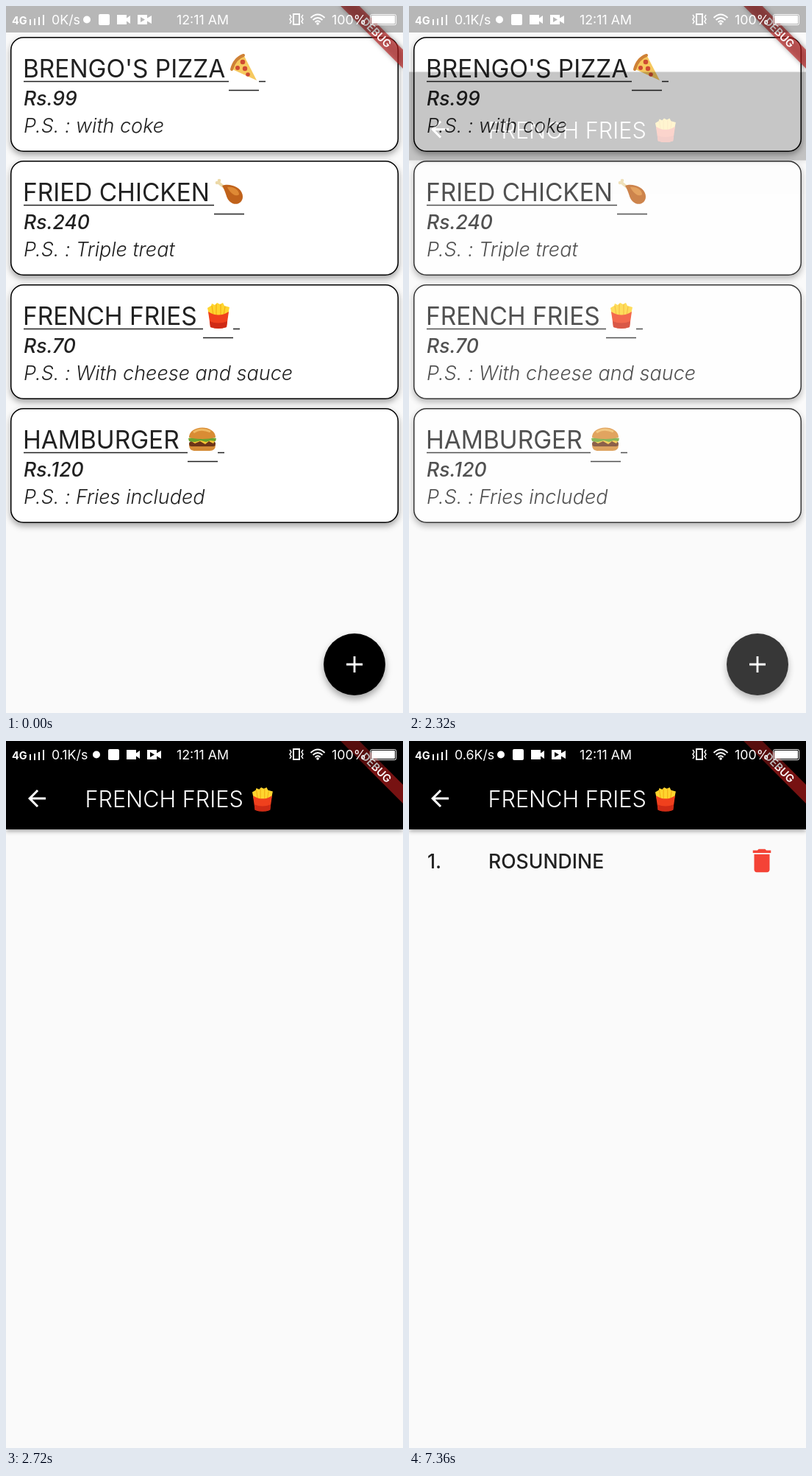
An HTML page that plays this animation: 540x960 px, repeating every 8 s.

```html
<!DOCTYPE html>
<html lang="en">
<head>
<meta charset="utf-8">
<title>Food orders</title>
<style>
  html, body { margin: 0; width: 100%; height: 100%; overflow: hidden; background: #fafafa; }
  svg { display: block; width: 540px; height: 960px; font-family: Inter, Roboto, sans-serif; }
  .card { fill: #fff; stroke: #000; stroke-width: 1.5; filter: drop-shadow(0 4px 4px rgba(0,0,0,.36)); }
  .ink { fill: #212121; }
  .rule { stroke: #212121; stroke-width: 1.6; fill: none; }
  .title { font-size: 33.4px; }
  .price { font-size: 26.5px; font-weight: 500; font-style: italic; }
  .note { font-size: 27px; font-weight: 300; font-style: italic; }
  .row { font-size: 26.6px; font-weight: 500; }
  .heading { fill: #fff; font-size: 30.6px; font-weight: 300; }
  .fab { filter: drop-shadow(0 5px 5px rgba(0,0,0,.35)); }
  .bar { filter: drop-shadow(0 2px 3px rgba(0,0,0,.4)); }
  .status { fill: #fff; font-size: 17.8px; }
  .line { fill: none; stroke: #fff; }
</style>
</head>
<body>
<svg viewBox="0 0 540 960">
  <defs>
    <g id="pizza">
      <path d="M5 22Q9 8 21 4L38 37Z" fill="#f6c95f"/>
      <path d="M4 22Q8 7 20 3" fill="none" stroke="#cf8136" stroke-width="4" stroke-linecap="round"/>
      <g fill="#cf4b32">
        <circle cx="19" cy="12" r="3.3"/><circle cx="12" cy="20" r="3"/>
        <circle cx="22" cy="21" r="3.2"/><circle cx="26" cy="29" r="2.8"/>
      </g>
    </g>
    <g id="chicken">
      <path d="M5 7L16 16" stroke="#ecd9a8" stroke-width="4"/>
      <circle cx="4" cy="8" r="2.3" fill="#ecd9a8"/><circle cx="7" cy="5" r="2.3" fill="#ecd9a8"/>
      <path d="M11 12C21 8 39 14 39 27C39 36 29 40 22 34C16 29 17 22 11 12Z" fill="#c0621b"/>
      <path d="M18 14C27 13 34 18 34 24C29 28 22 22 18 14Z" fill="#de8934"/>
    </g>
    <g id="fries">
      <path d="M6 10L11 7 12 4 16 6 19 3 23 5 27 3 29 7 36 9 33 24H9Z" fill="#ffd52e"/>
      <path d="M12 7L14 20M18 5V20M24 5V20M30 8L28 20" stroke="#f3ae16" stroke-width="1.2"/>
      <path d="M7 15Q21 24 35 15L32 36Q21 40 10 36Z" fill="#f0401d"/>
      <path d="M9 28L10 36Q21 40 32 36L33 28Q21 33 9 28Z" fill="#cf2a15"/>
    </g>
    <g id="burger">
      <path d="M2 28H38Q38 36 30 36H10Q2 36 2 28Z" fill="#d48a35"/>
      <rect x="2" y="23" width="36" height="7" rx="3.5" fill="#6d3518"/>
      <path d="M2 21H38L35 26 29 23 24 27 17 23 10 26Z" fill="#f8c534"/>
      <path d="M1 19Q20 15 39 19L38 23 31 22 25 24 18 22 10 24 2 23Z" fill="#6aa52f"/>
      <path d="M2 18C2 0 38 0 38 18Q20 22 2 18Z" fill="#d98c34"/>
      <path d="M8 11Q18 4 31 10" fill="none" stroke="#efb861" stroke-width="3"/>
    </g>
  </defs>

  <rect width="540" height="960" fill="#fafafa"/>
  <g id="list"></g>
  <g class="fab"><circle cx="474" cy="894" r="42"/></g>
  <path class="line" d="M463 894H485M474 883V905" stroke-width="2.8"/>

  <g id="page">
    <rect width="540" height="960" fill="#fafafa"/>
    <rect class="bar" width="540" height="120"/>
    <path transform="translate(24 60) scale(1.5)" fill="#fff"
      d="M20 11H7.83l5.59-5.59L12 4l-8 8 8 8 1.41-1.41L7.83 13H20v-2z"/>
    <text class="heading" x="107.5" y="90">FRENCH FRIES</text>
    <use href="#fries" transform="translate(329.4 60.2) scale(.93)"/>
    <g id="row">
      <g class="ink row"><text x="25" y="173">1.</text><text x="108" y="173">ROSUNDINE</text></g>
      <path transform="translate(459 141.5) scale(1.75)" fill="#f44336"
        d="M6 19c0 1.1.9 2 2 2h8c1.1 0 2-.9 2-2V7H6v12zM19 4h-3.5l-1-1h-5l-1 1H5v2h14V4z"/>
    </g>
  </g>

  <g transform="translate(540 0) rotate(45)">
    <rect x="-60" y="42" width="120" height="18" fill="#b71c1c" fill-opacity=".65"
      style="filter:drop-shadow(0 0 3px rgba(0,0,0,.5))"/>
    <text y="56.4" text-anchor="middle" fill="#fff" font-size="14.6" font-weight="600">DEBUG</text>
  </g>

  <rect width="540" height="36" fill-opacity=".27"/>
  <g class="status">
    <text x="8" y="25" font-size="14.5" font-weight="700">4G</text>
    <path class="line" d="M33 26V18M39 26V17M45 26V15M51 26V12" stroke-width="2"/>
    <text id="speed" x="62" y="25"></text>
    <g id="icons">
      <circle cx="110" cy="18.5" r="5"/>
      <rect x="126" y="11" width="15" height="15" rx="2"/>
      <path d="M151 12H164V16.5L169 13V24L164 20.5V25H151Z"/>
      <path fill-rule="evenodd" d="M179 12H192V16.5L198 13V24L192 20.5V25H179ZM183 15V22L189 18.5Z"/>
    </g>
    <text x="232" y="24.5">12:11 AM</text>
    <path class="line" d="M391 11H399V25H391Z" stroke-width="2"/>
    <path class="line" d="M386 12L388 15 386 18 388 21 386 24M404 12L402 15 404 18 402 21 404 24" stroke-width="1.4"/>
    <path class="line" d="M414.5 16Q424 7 433.5 16M417.5 19Q424 13 430.5 19M420.5 22Q424 18.5 427.5 22" stroke-width="2"/>
    <circle cx="424" cy="24" r="1.8"/>
    <text x="443" y="25">100%</text>
    <rect class="line" x="495.6" y="11.6" width="35" height="14" rx="2"/>
    <rect x="497" y="13" width="32" height="11" rx="1"/>
  </g>
</svg>
<script>
  const $ = id => document.getElementById(id);

  // title, price, note, emoji, emoji x, length of the underline after the emoji
  const foods = [
    ["BRENGO'S PIZZA", 99, "with coke", "pizza", 303, 9],
    ["FRIED CHICKEN", 240, "Triple treat", "chicken", 283, 0],
    ["FRENCH FRIES", 70, "With cheese and sauce", "fries", 268, 9],
    ["HAMBURGER", 120, "Fries included", "burger", 247, 9]
  ];
  $("list").innerHTML = foods.map(([title, price, note, emoji, x, tail], i) => `
    <g transform="translate(0 ${168 * i})">
      <rect class="card" x="6.75" y="42.75" width="526.5" height="154.5" rx="17"/>
      <g class="ink">
        <text class="title" x="23" y="96.5">${title}</text>
        <text class="price" x="24" y="135">Rs.${price}</text>
        <text class="note" x="24" y="172">P.S. : ${note}</text>
      </g>
      <path class="rule" d="M24 102.5H${x}M${x} 114.5h41m0 -12h${tail}"/>
      <use href="#${emoji}" x="${x}" y="64"/>
    </g>`).join("");

  // Cubic Bezier easing, solved for x by bisection
  function ease(x, x1, y1, x2, y2) {
    const curve = (s, a, b) => 3 * a * s * (1 - s) ** 2 + 3 * b * s * s * (1 - s) + s ** 3;
    let lo = 0, hi = 1;
    for (let i = 0; i < 30; i++) {
      const mid = (lo + hi) / 2;
      if (curve(mid, x1, x2) < x) lo = mid; else hi = mid;
    }
    return curve(lo, y1, y2);
  }

  const STEP = 80, LOOP = 8000, OPEN = 2198, OPEN_TIME = 300;

  function draw() {
    const time = Math.floor(performance.now() % LOOP / STEP) * STEP;
    const t = time < 2320 ? 0 : Math.min(1, (time - OPEN) / OPEN_TIME);
    const page = $("page");
    page.style.display = t ? "" : "none";
    page.setAttribute("opacity", ease(t, .42, 0, 1, 1));
    page.setAttribute("transform", `translate(0 ${240 * (1 - ease(t, .4, 0, .2, 1))})`);
    $("row").style.display = time < 4320 ? "none" : "";

    const [speed, shift] = time < 2240 ? ["0K/s", 0] : time < 5280 ? ["0.1K/s", 13] : ["0.6K/s", 15];
    $("speed").textContent = speed;
    $("icons").setAttribute("transform", `translate(${shift} 0)`);
    requestAnimationFrame(draw);
  }
  draw();
</script>
</body>
</html>
```
